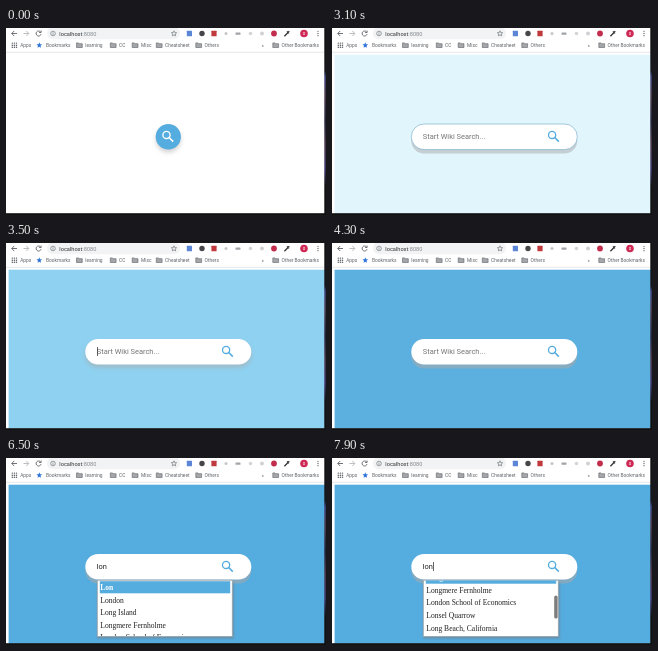
These frames come from a looping animation (320x187 px, 8 s). An HTML page:

```html
<!DOCTYPE html>
<html lang="en">
<head>
<meta charset="utf-8">
<title>Wiki search</title>
<style>
html, body { margin: 0; width: 100%; height: 100%; overflow: hidden; background: #fff; }
svg { display: block; width: 100%; height: 100%; }
text { font: 4.85px Roboto, Arial, sans-serif; fill: #5f6368; white-space: pre; }
.url { font-size: 5.65px; fill: #333; }
.port { fill: #85888c; }
#query { font-size: 7.46px; }
#rows text { font: 7.55px "Liberation Serif", Times, serif; fill: #222; }
#rows .on text { fill: #fff; font-weight: bold; }
#rows rect { fill: none; }
#rows .on rect { fill: #55acdf; }
</style>
</head>
<body>
<svg viewBox="0 0 320 187" preserveAspectRatio="none">
  <defs>
    <filter id="blur" x="-20%" y="-50%" width="140%" height="200%"><feGaussianBlur id="soft" stdDeviation="2"/></filter>
    <filter id="blur2" x="-10%" y="-10%" width="120%" height="120%"><feGaussianBlur stdDeviation=".8"/></filter>
    <clipPath id="clip"><rect x="91.8" y="122.6" width="134" height="55.4"/></clipPath>
    <linearGradient id="desk" x2="0" y2="1">
      <stop offset="0" stop-color="#111"/><stop offset=".23" stop-color="#16161c"/>
      <stop offset=".26" stop-color="#3a3f78"/><stop offset=".36" stop-color="#4a3a4a"/>
      <stop offset=".5" stop-color="#22243c"/><stop offset=".62" stop-color="#4a3646"/>
      <stop offset=".75" stop-color="#3a3468"/><stop offset=".85" stop-color="#111"/>
    </linearGradient>
  </defs>

  <rect width="320" height="187" fill="#fff"/>
  <rect id="page" x="2.6" y="26.7" width="317" height="159"/>

  <g fill="none" stroke="#5f6368" stroke-width=".9">
    <rect x="41" y="-1" width="133" height="12.2" rx="6" fill="#f1f3f4" stroke="none"/>
    <path d="M11 5.5H5.8M8.2 3L5.7 5.5L8.2 8"/>
    <path d="M17.5 5.5H22.7M20.3 3L22.8 5.5L20.3 8" stroke="#b4b6b9"/>
    <path d="M34.6 4A2.5 2.5 0 1 0 35 6.2M35.1 2.6V4.5H33.1"/>
    <circle cx="47" cy="5.5" r="2.3" stroke-width=".6"/>
    <path d="M47 5.2V6.9M47 4V4.6" stroke-width=".6"/>
    <path d="M0 24.3H319" stroke="#dcdde0" stroke-width=".7"/>
  </g>
  <text class="url" x="53.3" y="7.6">localhost<tspan class="port">:8080</tspan></text>
  <g id="bar"></g>

  <rect id="shadow" filter="url(#blur)"/>
  <rect id="pill" stroke="#7fb2cc" stroke-width=".7"/>
  <g id="lens" fill="none" stroke-width="1.3"><circle cx="-1.5" cy="-1.5" r="3.6"/><path d="M1.1 1.1L5.2 5.2" stroke-width="1.6"/></g>
  <text id="query" x="90.8" y="111.2"></text>
  <rect id="caret" y="104" width=".7" height="9" fill="#222"/>

  <g id="list">
    <rect x="91.6" y="124" width="136" height="56.4" fill="#777" opacity=".6" filter="url(#blur2)"/>
    <rect x="91.3" y="122.2" width="135" height="56.2" fill="#fff" stroke="#9aa6ad" stroke-width=".8"/>
    <g clip-path="url(#clip)"><g id="rows"></g></g>
    <rect id="thumb" x="222.2" width="3.4" height="23" rx="1.7" fill="#7d7d7d"/>
  </g>

  <rect x="318.3" width="1.7" height="187" fill="url(#desk)"/>
  <rect y="185.2" width="320" height="1.8" fill="#111"/>
</svg>
<script>
const $ = id => document.getElementById(id);
const NS = "http://www.w3.org/2000/svg";
const set = (el, attrs) => { for (const k in attrs) el.setAttribute(k, attrs[k]); return el; };
const add = (parent, tag, attrs, text = "") => {
  const el = set(document.createElementNS(NS, tag), attrs);
  el.textContent = text;
  return parent.appendChild(el);
};

// Browser bars
const bar = $("bar");
const label = (x, y, text, attrs = {}) => add(bar, "text", { x, y, ...attrs }, text);
const dot = (cx, cy, r, fill) => add(bar, "circle", { cx, cy, r, fill });
const box = (x, y, width, height, fill) => add(bar, "rect", { x, y, width, height, fill, rx: .5 });
const star = (cx, cy, r, attrs) => {
  const points = Array.from({ length: 10 }, (_, i) => {
    const a = i * Math.PI / 5, d = i % 2 ? r * .45 : r;
    return [cx + d * Math.sin(a), cy - d * Math.cos(a)];
  });
  add(bar, "polygon", { points: points.join(" "), ...attrs });
};
const folder = (x, text) => {
  add(bar, "path", { d: `M${x} 14.9h2.2l.7 .8h2.9v3.8h-5.8z`, fill: "#a4a6a9", stroke: "#5f6368", "stroke-width": .6 });
  label(x + 8.8, 18.9, text);
};

star(168, 5.6, 2.8, { fill: "none", stroke: "#5f6368", "stroke-width": .6 });
box(180.8, 2.8, 5.2, 5.4, "#5b86d6");
dot(196, 5.5, 2.7, "#44464a");
box(205.4, 2.8, 5.2, 5.4, "#c0393c");
dot(220, 5.5, 1.5, "#c3c5c8");
box(229.5, 4.4, 5, 2.4, "#a2a4a8");
dot(244.5, 5.5, 1.8, "#d4d5d8");
dot(256, 5.5, 2, "#d0d1d4");
dot(268, 5.5, 2.9, "#c22c4d");
add(bar, "path", { d: "M278.4 8.2L281.8 4.8M281 3.4L283 5.4M282 4.5L283.3 3.2", stroke: "#333", "stroke-width": 1.3 });
dot(298, 5.5, 3.8, "#cf2a56");
label(296.8, 7.1, "s", { style: "fill:#fff" });
for (const y of [3.3, 5.5, 7.7]) dot(312, y, .65, "#5f6368");

for (let i = 0; i < 9; i++) box(5.6 + i % 3 * 2.1, 14.4 + Math.floor(i / 3) * 2.1, 1.4, 1.4, "#6a6d72");
label(14.2, 18.9, "Apps");
star(33.3, 17.3, 3, { fill: "#2f75d8" });
label(40, 18.9, "Bookmarks");
[[70.5, "learning"], [104.3, "CC"], [126.2, "Misc"], [150.3, "Cheatsheet"], [189.8, "Others"], [266.8, "Other Bookmarks"]]
  .forEach(f => folder(...f));
label(255.6, 18.9, "»");

// Suggestions
const ROW = 12.6, TOP = 123.2, HOVER = 125;
const rows = ["Lon", "London", "Long Island", "Longmere Fernholme", "London School of Economics",
  "Lonsel Quarrow", "Long Beach, California"].map((name, i) => {
  const g = add($("rows"), "g", {});
  add(g, "rect", { x: 93.8, y: TOP + i * ROW, width: 130.4, height: ROW - .5 });
  add(g, "text", { x: 94.3, y: TOP + i * ROW + 8.7 }, name);
  return g;
});

// Motion
const mix = (a, b, p) => Array.isArray(a) ? a.map((v, i) => mix(v, b[i], p)) : a + (b - a) * p;
const ramp = (t, a, b) => Math.min(1, Math.max(0, (t - a) / (b - a)));
const ease = p => p * p * (3 - 2 * p);
const track = (t, keys) => {
  const i = keys.findIndex(k => k[0] > t);
  if (i < 0) return keys[keys.length - 1][1];
  if (!i) return keys[0][1];
  const [a, b] = [keys[i - 1], keys[i]];
  return mix(a[1], b[1], ramp(t, a[0], b[0]));
};
const rgb = c => `rgb(${c.map(Math.round)})`;
const show = (el, on) => set(el, { visibility: on ? "visible" : "hidden" });

const WHITE = [255, 255, 255], BLUE = [85, 172, 223];
const PAGE = [[2850, WHITE], [3100, [225, 245, 253]], [3300, [179, 224, 244]], [3500, [142, 209, 240]],
  [3800, [115, 193, 232]], [4300, [91, 176, 224]], [4700, BLUE]];
// drop, blur, opacity
const SHADOW = [[2850, [3, 2, .5]], [3100, [4, .6, .5]], [3300, [.7, .5, .5]],
  [3500, [3, 2, .6]], [4300, [4, .7, .55]]];

function draw(t) {
  const open = ease(ramp(t, 2830, 3080));
  const width = mix(25.2, 166, open), x = 162.3 - width / 2;
  const shape = { x, y: 96, width, height: 25.6, rx: 12.8 };
  const [drop, blur, alpha] = track(t, SHADOW);
  set($("page"), { fill: rgb(track(t, PAGE)) });
  set($("shadow"), { ...shape, y: 96 + drop, opacity: alpha, fill: "#aaa" });
  set($("soft"), { stdDeviation: blur });
  set($("pill"), { ...shape, fill: rgb(mix(BLUE, WHITE, open)), "stroke-opacity": open * (1 - ramp(t, 3100, 3300)) });
  set($("lens"), { transform: `translate(${mix(162, 221.6, open)} 108.4)`, stroke: rgb(mix(WHITE, BLUE, open)) });

  const typed = "lon".slice(0, t < 5700 ? 0 : Math.min(3, 1 + Math.floor((t - 5700) / 100)));
  const query = $("query");
  query.textContent = typed || "Start Wiki Search...";
  query.style.fill = typed ? "#222" : "#757575";
  query.style.opacity = ramp(t, 2950, 3080);
  const blink = t >= 3700 && Math.floor((t - 3700) / 500) % 2 === 0;
  set($("caret"), { x: typed ? 91 + query.getComputedTextLength() : 91 });
  show($("caret"), blink || (t >= 3400 && t < 3700));

  const scroll = 34.8 * ease(ramp(t, 7050, 7900));
  show($("list"), t >= 6000);
  show($("thumb"), t >= 7100);
  set($("thumb"), { y: 123 + scroll * .42 });
  set($("rows"), { transform: `translate(0 ${-scroll})` });
  const hot = Math.floor((HOVER - TOP + scroll) / ROW);
  rows.forEach((g, i) => set(g, { class: i === hot ? "on" : "" }));
}

const start = performance.now();
function tick() {
  draw((performance.now() - start) % 8000);
  requestAnimationFrame(tick);
}
tick();
</script>
</body>
</html>
```
